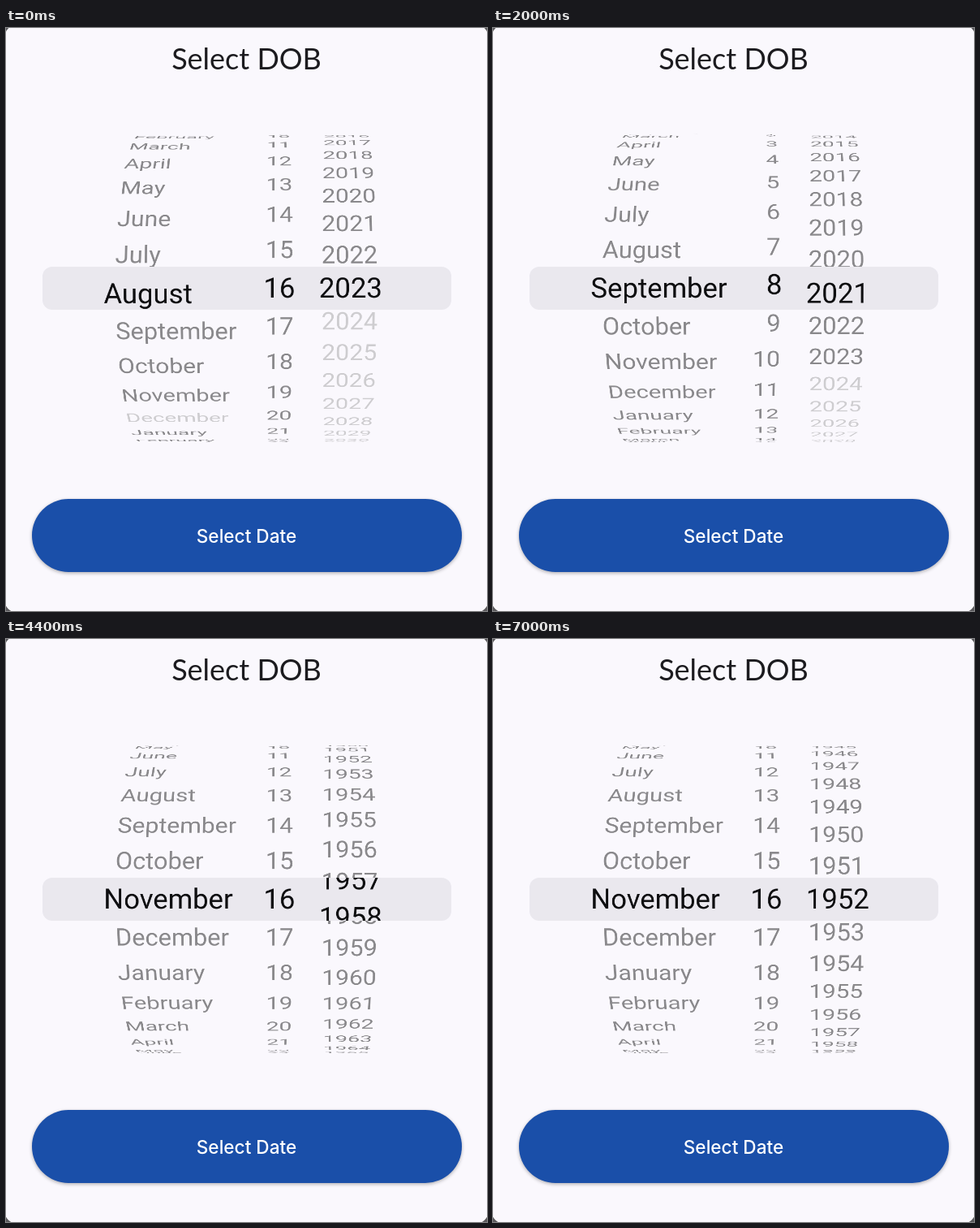
Recreate the animation shown at these times as an HTML page with a canvas. Size 593 by 718 pixels, loop 7.1 s.

```html
<!DOCTYPE html>
<html lang="en">
<head>
<meta charset="utf-8">
<title>Select DOB</title>
<style>
  html, body { margin: 0; width: 100%; height: 100%; overflow: hidden; background: #5a595c; }
  canvas { display: block; width: 593px; height: 718px; }
</style>
</head>
<body>
<canvas id="stage" width="593" height="718"></canvas>
<script>
const ctx = document.getElementById('stage').getContext('2d');
const LOOP = 7100;
const MONTHS = ['January', 'February', 'March', 'April', 'May', 'June', 'July',
  'August', 'September', 'October', 'November', 'December'];
const MAX = { year: 2023, month: 10, day: 16 };

// Wheel geometry: radius, perspective strength, centre line, magnifier
const R = 254, Q = 0.4, CY = 320.3, MAG = 1.119;
const BAND = { x: 45, y: 294, w: 504, h: 53 };
const MAX_ANGLE = 1.34;
const FONT = 31, HALF = 22, SCALE = 2;

const mod = (n, m) => ((n % m) + m) % m;
const smooth = u => u * u * (3 - 2 * u);

// step: angle per item; axis: vanishing x; lens: magnifier centre x; x: text anchor
const columns = [
  { step: 0.188, axis: 268, lens: 248, x: 134, align: 'left',
    label: i => MONTHS[mod(i, 12)],
    invalid: (i, s) => s.year === MAX.year && mod(i, 12) > MAX.month },
  { step: 0.188, axis: 330, lens: 340, x: 354.7, align: 'right',
    label: i => String(mod(i - 1, 31) + 1),
    invalid: (i, s) => s.year === MAX.year && s.month === MAX.month && mod(i - 1, 31) + 1 > MAX.day },
  { step: 0.1625, axis: 404, lens: 413, x: 423.6, align: 'center',
    label: String,
    invalid: i => i > MAX.year }
];

const monthKeys = [[0, 6.87], [800, 9.345], [1500, 8], [2200, 8], [3000, 11.25], [3250, 10]];
const dayKeys = [[900, 16], [2000, 8.08], [2150, 8], [2400, 8], [3000, 9.87], [3250, 16]];
const yearKeys = [[1500, 2023], [2000, 2020.86], [3000, 2028.36], [3171, 2023]];

function follow(keys, t) {
  if (t <= keys[0][0]) return keys[0][1];
  for (let i = 1; i < keys.length; i++) {
    const [t0, a] = keys[i - 1], [t1, b] = keys[i];
    if (t < t1) return a + (b - a) * smooth((t - t0) / (t1 - t0));
  }
  return keys[keys.length - 1][1];
}

function yearAt(t) {
  const start = 3171, stop = 6500;
  if (t < start) return follow(yearKeys, t);
  const decay = ms => Math.exp(-(ms - start) / 482);
  return 1952 + 71 * Math.max(0, decay(t) - decay(stop) * smooth(Math.min(1, (t - start) / (stop - start))))
    * (t < stop ? 1 : 0);
}

// Text bitmaps, also kept at reduced heights for steep angles
const sprites = new Map();
function sprite(text, color, level) {
  const key = text + color + level;
  if (sprites.has(key)) return sprites.get(key);
  const c = document.createElement('canvas');
  const g = c.getContext('2d');
  const font = FONT + 'px Roboto, Arial, sans-serif';
  g.font = font;
  const w = g.measureText(text).width;
  const sy = SCALE / 2 ** level;
  c.width = Math.ceil((w + 4) * SCALE);
  c.height = Math.ceil(HALF * 2 * sy);
  g.scale(SCALE, sy);
  g.font = font;
  g.fillStyle = color;
  g.fillText(text, 2, HALF + FONT * 0.3416);
  const s = { c, w, sy };
  sprites.set(key, s);
  return s;
}

// Projects one label row by row between screen rows top and bottom
function drawLabel(col, text, color, angle, mag, top, bottom) {
  const sin = Math.sin(angle), cos = Math.cos(angle), p = Q / R;
  const w0 = 1 + Q * (1 - cos);
  const project = v => (R * sin + v * cos) / (w0 + p * v * sin);
  const unproject = y => (y * w0 - R * sin) / (cos - y * p * sin);
  const ya = project(-HALF) * mag + CY, yb = project(HALF) * mag + CY;
  const from = Math.max(top, Math.floor(Math.min(ya, yb)));
  const to = Math.min(bottom, Math.ceil(Math.max(ya, yb)));
  if (from >= to) return;

  const density = HALF * 2 / Math.max(0.5, Math.abs(yb - ya)) * SCALE;
  const level = Math.max(0, Math.min(4, Math.round(Math.log2(density)) - 1));
  const s = sprite(text, color, level);
  const shift = { left: 0, right: s.w, center: s.w / 2 }[col.align];
  const left = col.x - shift - 2;
  const width = s.c.width / SCALE;

  for (let y = from; y < to; y++) {
    const v0 = unproject((y - CY) / mag), v1 = unproject((y + 1 - CY) / mag);
    const lo = Math.max(-HALF, Math.min(v0, v1));
    const hi = Math.min(HALF, Math.max(v0, v1));
    if (hi - lo < 0.01) continue;
    const w = w0 + p * (lo + hi) / 2 * sin;
    let x = col.axis + (left - col.axis) / w;
    x = col.lens + (x - col.lens) * mag;
    const part = Math.min(1, (hi - lo) / Math.abs(v1 - v0));
    const dy = v0 < -HALF || v1 < -HALF === (v1 < v0) && v1 < v0 ? 1 - part : 0;
    ctx.drawImage(s.c, 0, (lo + HALF) * s.sy, s.c.width, (hi - lo) * s.sy,
      x, y + dy, width * mag / w, part);
  }
}

function drawColumn(col, pos, selected) {
  const reach = MAX_ANGLE / col.step;
  const bandEnd = BAND.y + BAND.h;
  for (let i = Math.ceil(pos - reach); i <= pos + reach; i++) {
    const angle = (i - pos) * col.step;
    const text = col.label(i);
    const color = col.invalid(i, selected) ? '#999999' : '#000000';
    ctx.globalAlpha = 0.447;
    drawLabel(col, text, color, angle, 1, 125, BAND.y);
    drawLabel(col, text, color, angle, 1, bandEnd, 516);
    ctx.globalAlpha = 1;
    if (Math.abs(i - pos) < 2) drawLabel(col, text, color, angle, MAG, BAND.y, bandEnd);
  }
}

function box(x, y, w, h, r, fill) {
  ctx.beginPath();
  ctx.roundRect(x, y, w, h, r);
  ctx.fillStyle = fill;
  ctx.fill();
}

function caption(text, y, font, fill) {
  ctx.font = font;
  ctx.fillStyle = fill;
  ctx.textAlign = 'center';
  ctx.fillText(text, 296.5, y);
}

function render(t) {
  ctx.fillStyle = '#5a595c';
  ctx.fillRect(0, 0, 593, 718);
  box(-2, -4, 597, 724, 16, '#faf8fd');
  caption('Select DOB', 51, '36px Lato, "Open Sans", sans-serif', '#1c1b1f');

  const pos = [follow(monthKeys, t), follow(dayKeys, t), yearAt(t)];
  const selected = { month: mod(Math.round(pos[0]), 12), year: Math.round(pos[2]) };
  columns.forEach((col, i) => drawColumn(col, pos[i], selected));
  box(BAND.x, BAND.y, BAND.w, BAND.h, 12, 'rgba(118,118,128,0.12)');

  ctx.save();
  ctx.shadowColor = 'rgba(0,0,0,0.3)';
  ctx.shadowBlur = 4;
  ctx.shadowOffsetY = 1.5;
  box(32, 580, 530, 90, 45, '#1a4fa9');
  ctx.restore();
  caption('Select Date', 634, '500 22.6px Inter, Lato, sans-serif', '#ffffff');
}

const begin = performance.now();
function tick() {
  render((performance.now() - begin) % LOOP);
  requestAnimationFrame(tick);
}
tick();
</script>
</body>
</html>
```
